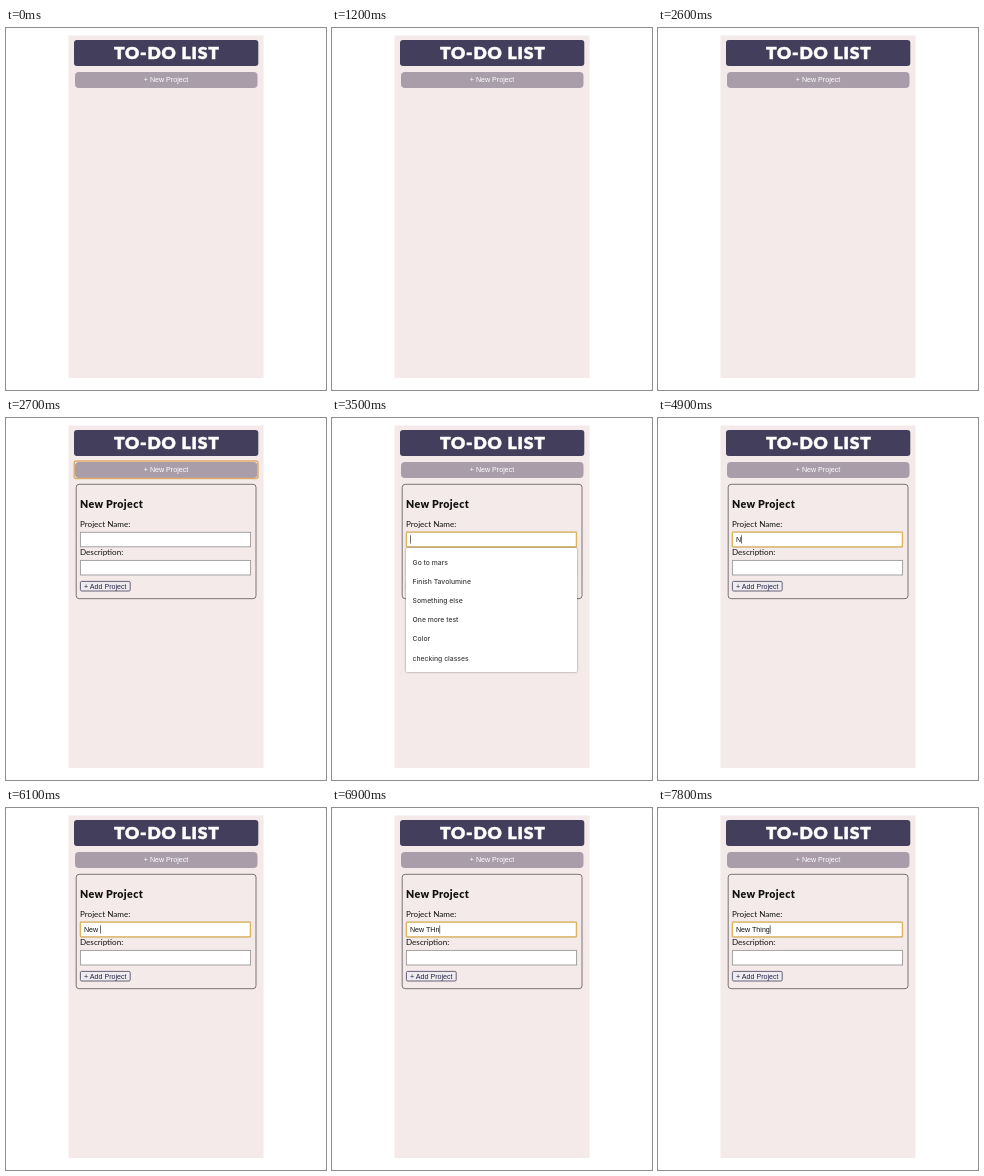
These frames come from a looping animation (320 px wide and 362 px high, 8 s). An HTML page:

```html
<!DOCTYPE html>
<html lang="en">
<head>
<meta charset="utf-8">
<title>To-do list</title>
<style>
  html, body { margin: 0; width: 100%; height: 100%; overflow: hidden; background: #e4e4e4; }
  svg { display: block; width: 320px; height: 362px; }
  text { white-space: pre; }
  .title { font: 900 17.5px Lato, sans-serif; letter-spacing: .8px; fill: #fff; stroke: #fff; stroke-width: .5; }
  .head { font: 900 10.6px Lato, sans-serif; letter-spacing: .36px; fill: #111; }
  .label { font: 8.1px Lato, sans-serif; fill: #111; }
  .ui { font: 7.1px "Liberation Sans", Arial, sans-serif; }
  .menu { font: 500 6.8px Inter, sans-serif; fill: #3c3c3c; }
  .box { fill: #fff; stroke: #9a9899; stroke-width: .9; }
  .drop { fill: #fff; filter: drop-shadow(0 .6px 1px rgba(0, 0, 0, .45)); }
  .off { visibility: hidden; }
</style>
</head>
<body>
<svg viewBox="0 0 320 362">
  <rect width="320" height="362" rx="2" fill="#fff"/>
  <rect x="62.5" y="7.5" width="195" height="342.5" fill="#f4eae9"/>
  <rect x="68" y="12" width="184.3" height="26" rx="3" fill="#423e5c"/>
  <text class="title" x="160.8" y="31" text-anchor="middle">TO-DO LIST</text>

  <rect x="69" y="44" width="182.5" height="16" rx="4" fill="#a99da9"/>
  <rect id="ring" x="68.2" y="43" width="183.8" height="17.5" rx="2" fill="none" stroke="#dfab68" stroke-width="1.4"/>
  <text class="ui" x="160" y="54.3" text-anchor="middle" fill="#fff">+ New Project</text>

  <g id="form">
    <rect x="70.2" y="66.3" width="179.8" height="114.4" rx="3" fill="none" stroke="#5c5659" stroke-width=".8"/>
    <text class="head" x="74" y="90">New Project</text>
    <text class="label" x="74" y="109">Project Name:</text>
    <rect class="box" x="74.4" y="114.3" width="170.2" height="14.5"/>
    <text class="label" x="74" y="137.3">Description:</text>
    <rect class="box" x="74.4" y="142.4" width="170.2" height="14.6"/>
    <rect x="74.4" y="163.4" width="49.8" height="9.6" rx="1.3" fill="#efecf0" stroke="#55526b" stroke-width=".9"/>
    <text class="ui" x="99.3" y="170.6" text-anchor="middle" fill="#252348">+ Add Project</text>
  </g>

  <g id="focus">
    <rect x="74.4" y="114.2" width="170" height="14.6" rx=".8" fill="#fff" stroke="#dcb45a" stroke-width="1.3"/>
    <text id="typed" class="ui" x="78" y="124.2" fill="#111"></text>
    <rect id="caret" y="117.3" width=".7" height="8.3" fill="#333"/>
  </g>

  <g id="menu">
    <rect class="drop" x="74" y="130" width="171" height="124" rx="1.5"/>
  </g>
</svg>
<script>
  const LOOP = 8000;
  const $ = id => document.getElementById(id);
  const show = (el, on) => el.classList.toggle('off', !on);

  ['Go to mars', 'Finish Tavolumine', 'Something else', 'One more test', 'Color', 'checking classes']
    .forEach((label, i) => {
      const item = document.createElementNS('http://www.w3.org/2000/svg', 'text');
      item.setAttribute('class', 'menu');
      item.setAttribute('x', 80.6);
      item.setAttribute('y', 146.6 + i * 19.2);
      item.textContent = label;
      $('menu').append(item);
    });

  // [start ms, field text, caret visible]
  const typing = [
    [0, '', true], [3900, '', false], [4500, '', true],
    [4900, 'N', true], [5400, 'Ne', true], [5600, 'New', true],
    [6100, 'New ', true], [6400, 'New TH', true], [6700, 'New THn', true],
    [7000, 'New TH', true], [7100, 'New T', true], [7200, 'New Th', true],
    [7400, 'New Thi', true], [7600, 'New Thin', true], [7800, 'New Thing', true]
  ];

  function draw(t) {
    show($('form'), t >= 2700);
    show($('ring'), t >= 2700 && t < 3500);
    show($('focus'), t >= 3500);
    show($('menu'), t >= 3500 && t < 4900);

    const [, text, lit] = typing.findLast(step => step[0] <= t);
    $('typed').textContent = text;
    $('caret').setAttribute('x', 78 + (text ? $('typed').getComputedTextLength() : 0));
    show($('caret'), lit && t >= 3500);
  }

  function tick() {
    draw(performance.now() % LOOP);
    requestAnimationFrame(tick);
  }
  tick();
</script>
</body>
</html>
```
